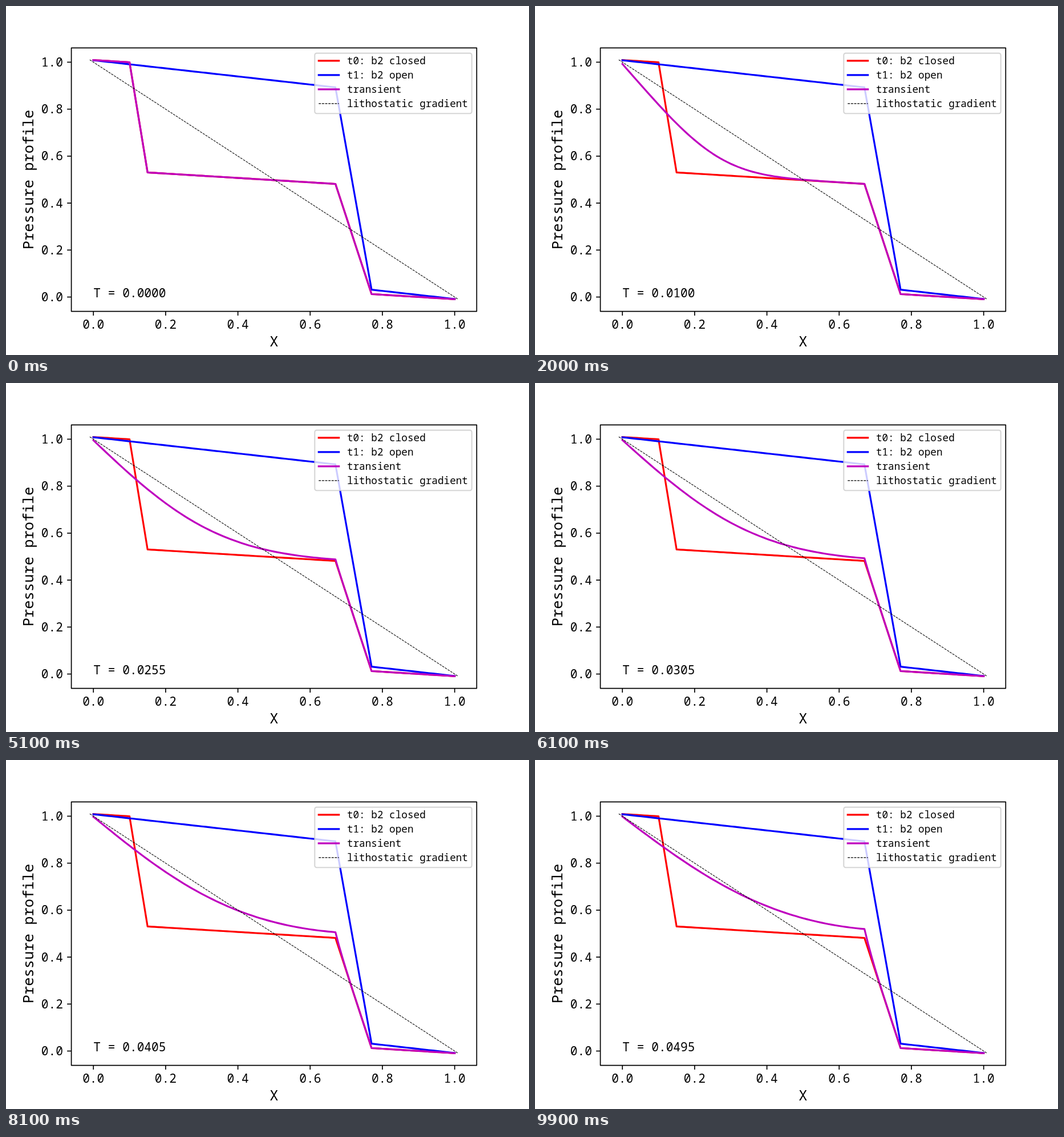
An HTML page with a canvas that plays this animation: 917x611 px, repeating every 10000 ms.

```html
<!DOCTYPE html>
<html lang="en">
<head>
<meta charset="utf-8">
<title>Pressure profile</title>
<style>
html, body { margin: 0; width: 100%; height: 100%; overflow: hidden; background: #fff; }
canvas { display: block; }
</style>
</head>
<body>
<canvas id="plot" width="917" height="611"></canvas>
<script>
const ctx = document.getElementById('plot').getContext('2d');
const PT = 917 / 6 / 72;
const LEFT = 114.6, RIGHT = 825.3, TOP = 73.3, BOTTOM = 534.6;
const LOW = -0.061, SPAN = 1.122;
const FONT = '"Noto Sans Mono", "DejaVu Sans Mono", monospace';
const px = x => LEFT + (x - LOW) / SPAN * (RIGHT - LEFT);
const py = y => BOTTOM - (y - LOW) / SPAN * (BOTTOM - TOP);

// Nodes run from x = -0.01 to 1.01; both ends hold the lithostatic pressure.
const DX = 0.01, NODES = 103;
const STEPS = 100, STEP_MS = 100, DT = 0.0005, SUB = 20;
const nodeX = i => (i - 1) * DX;

function conductivity(firstOpen, secondOpen) {
  return Array.from({ length: NODES - 1 }, (_, i) => {
    const x = nodeX(i + 0.5);
    if (!firstOpen && x > 0.1 && x < 0.15) return 0.01;
    if (!secondOpen && x > 0.67 && x < 0.77) return 0.02;
    return 1;
  });
}

function steady(k) {
  const total = k.reduce((sum, v) => sum + 1 / v, 0);
  const p = [1.01];
  k.forEach((v, i) => p.push(p[i] - 1.02 / total / v));
  return p;
}

function diffuse(p, k) {
  const r = DT / SUB / (DX * DX);
  for (let s = 0; s < SUB; s++) {
    const old = p;
    p = old.map((v, i) => i === 0 || i === NODES - 1 ? v
      : v + r * (k[i] * (old[i + 1] - v) - k[i - 1] * (v - old[i - 1])));
  }
  return p;
}

const opened = conductivity(true, false);
const closedLine = steady(conductivity(false, false));
const openLine = steady(opened);
const history = [closedLine];
while (history.length < STEPS) history.push(diffuse(history[history.length - 1], opened));

function stroke(color, width, cap = 'butt', dash = []) {
  ctx.strokeStyle = color;
  ctx.lineWidth = width;
  ctx.lineCap = cap;
  ctx.lineJoin = 'round';
  ctx.setLineDash(dash);
  ctx.stroke();
}

function segment(x1, y1, x2, y2) {
  ctx.beginPath();
  ctx.moveTo(x1, y1);
  ctx.lineTo(x2, y2);
}

function text(str, x, y, size, align = 'left') {
  ctx.font = size * PT + 'px ' + FONT;
  ctx.textAlign = align;
  ctx.fillStyle = '#000';
  ctx.fillText(str, x, y);
}

const solid = color => stroke(color, 1.5 * PT, 'square');
const dashed = () => stroke('#000', 0.5 * PT, 'butt', [1.85 * PT, 0.8 * PT]);

function curve(p, color) {
  ctx.beginPath();
  for (let i = 1; i < NODES - 1; i++) ctx.lineTo(px(nodeX(i)), py(p[i]));
  solid(color);
}

function axes() {
  for (let i = 0; i <= 5; i++) {
    const v = i / 5, x = px(v), y = py(v);
    segment(x, BOTTOM, x, BOTTOM + 3.5 * PT);
    stroke('#000', 0.8 * PT);
    segment(LEFT, y, LEFT - 3.5 * PT, y);
    stroke('#000', 0.8 * PT);
    text(v.toFixed(1), x, 565, 10, 'center');
    text(v.toFixed(1), 100, y + 7.6, 10, 'right');
  }
  ctx.beginPath();
  ctx.rect(LEFT, TOP, RIGHT - LEFT, BOTTOM - TOP);
  stroke('#000', 0.8 * PT);
  text('X', 470, 596, 12, 'center');
  ctx.save();
  ctx.translate(48, 304);
  ctx.rotate(-Math.PI / 2);
  text('Pressure profile', 0, 0, 12, 'center');
  ctx.restore();
}

function legend() {
  ctx.beginPath();
  ctx.roundRect(541.3, 82.6, 275.4, 105.6, 3.5);
  ctx.fillStyle = 'rgba(255,255,255,0.8)';
  ctx.fill();
  stroke('rgba(204,204,204,0.8)', PT);
  const rows = [['t0: b2 closed', '#f00'], ['t1: b2 open', '#00f'],
    ['transient', '#bf00bf'], ['lithostatic gradient', null]];
  rows.forEach(([label, color], i) => {
    const y = 95.9 + 25 * i;
    segment(548.3, y, 583.7, y);
    if (color) solid(color); else dashed();
    text(label, 597.9, y + 6.2, 8.33);
  });
}

function draw(now) {
  const step = Math.floor(now / STEP_MS) % STEPS;
  ctx.fillStyle = '#fff';
  ctx.fillRect(0, 0, 917, 611);
  curve(closedLine, '#f00');
  curve(openLine, '#00f');
  curve(history[step], '#bf00bf');
  segment(px(-0.01), py(1.01), px(1.01), py(-0.01));
  dashed();
  axes();
  text('T = ' + (step * DT).toFixed(4), px(0), py(0), 10);
  legend();
}

let start;
function tick(now) {
  if (start === undefined) start = now;
  draw(now - start);
  requestAnimationFrame(tick);
}
draw(0);
requestAnimationFrame(tick);
</script>
</body>
</html>
```
